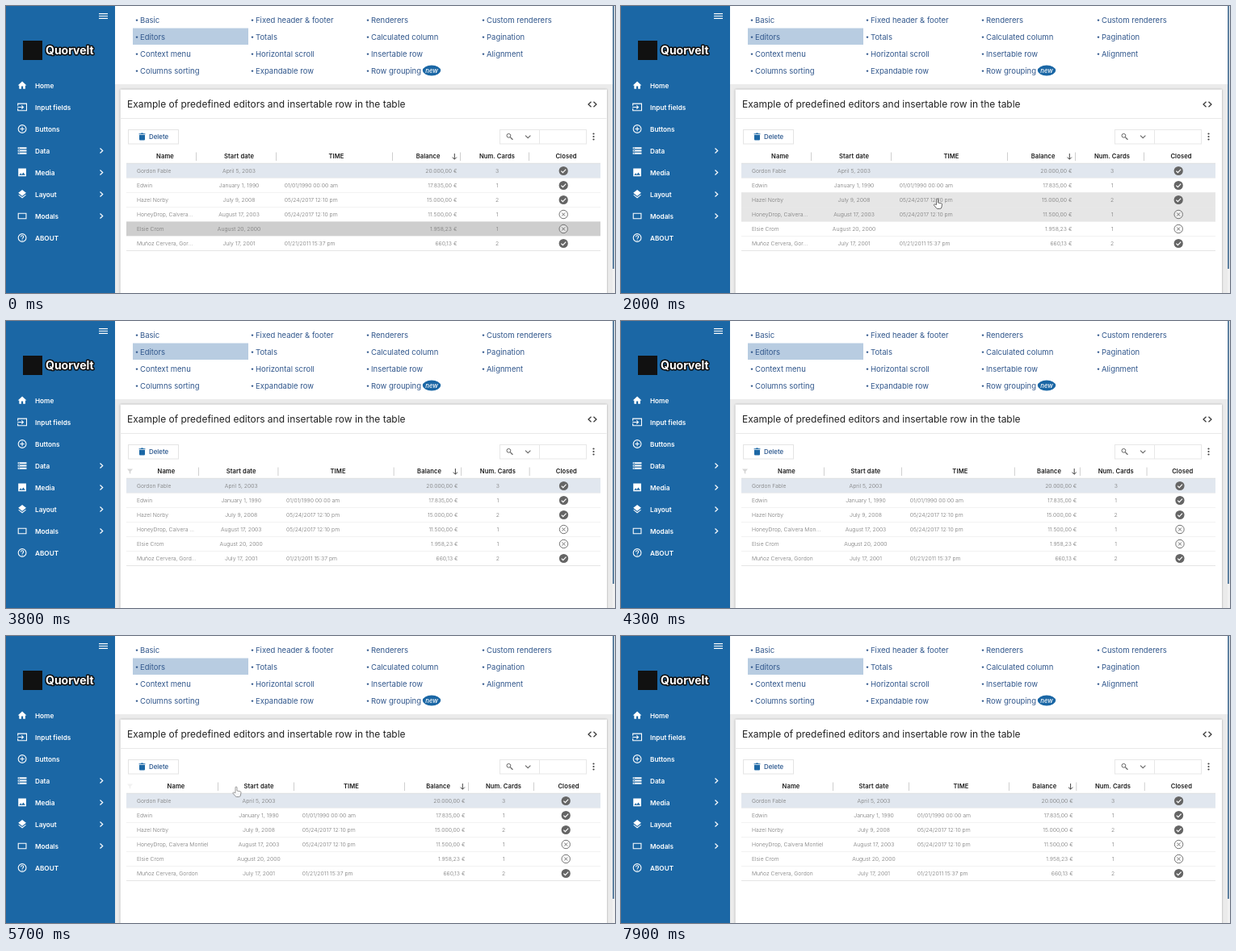
Write an HTML page that moves like this. It is 754 by 356 pixels and loops after 8000 ms.

```html
<!DOCTYPE html>
<html lang="en">
<head>
<meta charset="utf-8">
<title>Table demo</title>
<style>
  html, body { margin: 0; width: 100%; height: 100%; overflow: hidden; background: #fff; }
  svg { display: block; width: 754px; height: 356px; }
  text, .name { font-family: Inter, "Open Sans", sans-serif; }
  .link { font-size: 9.5px; fill: #31578c; }
  .side { font-size: 8.2px; font-weight: 600; fill: #fff; }
  .head { font-size: 7.6px; font-weight: 600; letter-spacing: .1px; fill: #1c1c1c; }
  .cell { font-size: 6.85px; font-weight: 300; fill: #777; }
  .name { font-size: 6.75px; font-weight: 300; line-height: 10px; color: #777;
          white-space: nowrap; overflow: hidden; text-overflow: ellipsis; }
  .mid { text-anchor: middle; }
  .end { text-anchor: end; }
  .card { filter: drop-shadow(0 0 1.2px #0005); }
</style>
</head>
<body>
<svg id="stage" viewBox="0 0 754 356"></svg>
<script>
const LOOP = 8000;
const BLUE = '#1b67a5';
const stage = document.getElementById('stage');

// ---- drawing helpers ----
const rect = (x, y, w, h, fill, extra = '') =>
  `<rect x="${x}" y="${y}" width="${w}" height="${h}" fill="${fill}" ${extra}/>`;
const path = (d, extra = '') => `<path d="${d}" ${extra}/>`;
const stroke = (d, color, width = 1, extra = '') =>
  path(d, `fill="none" stroke="${color}" stroke-width="${width}" ${extra}`);
const text = (x, y, str, cls, extra = '') =>
  `<text x="${x}" y="${y}" class="${cls}" ${extra}>${str.replace('&', '&amp;')}</text>`;

// ---- content ----
const links = [
  ['Basic', 'Editors', 'Context menu', 'Columns sorting'],
  ['Fixed header & footer', 'Totals', 'Horizontal scroll', 'Expandable row'],
  ['Renderers', 'Calculated column', 'Insertable row', 'Row grouping'],
  ['Custom renderers', 'Pagination', 'Alignment']
];

const ring = 'M12 3a9 9 0 100 18 9 9 0 100-18';
const sideItems = [
  ['Home', 'M10 20v-6h4v6h5v-8h3L12 3 2 12h3v8z', true],
  ['Input fields', 'M2 9V4H22V20H2V15M1 12H14M10.5 8l4 4-4 4'],
  ['Buttons', ring + 'M12 7v10M7 12h10'],
  ['Data', [4, 10, 16].map(y => `M2 ${y}h20v4H2zM4 ${y + 1}h2v2H4z`).join(''), true, true],
  ['Media', 'M3 3h18v18H3zM5 18h14l-4.5-6-3.5 4.5-2.5-3z', true, true],
  ['Layout', 'M12 2l9 7-9 7-9-7zM4.6 12.8l7.4 5.7 7.4-5.7 1.6 1.3-9 7-9-7z', true, true],
  ['Modals', 'M3 6h18v12H3z', false, true],
  ['ABOUT', ring + 'M9 10a3 3 0 116 0c0 2-3 2.3-3 4.5M12 16v2']
];

const rows = [
  ['Gordon Fable', 'April 5, 2003', '', '20.000,00 €', '3', true],
  ['Edwin', 'January 1, 1990', '01/01/1990 00:00 am', '17.835,00 €', '1', true],
  ['Hazel Norby', 'July 9, 2008', '05/24/2017 12:10 pm', '15.000,00 €', '2', true],
  ['HoneyDrop, Calvera Montiel', 'August 17, 2003', '05/24/2017 12:10 pm', '11.500,00 €', '1', false],
  ['Elsie Crom', 'August 20, 2000', '', '1.958,23 €', '1', false],
  ['Muñoz Cervera, Gordon', 'July 17, 2001', '01/21/2011 15:37 pm', '660,13 €', '2', true]
];
const headers = ['Name', 'Start date', 'TIME', 'Balance', 'Num. Cards', 'Closed'];
const rowTop = i => 195.5 + 18 * i;

// ---- static parts ----
function sidebar() {
  const items = sideItems.map(([label, d, solid, more], i) => {
    const y = 98.5 + 27 * i;
    const icon = solid ? path(d, 'fill="#fff" fill-rule="evenodd"') : stroke(d, '#fff', 2);
    return `<g transform="translate(13.6 ${y - 6.5}) scale(.54)">${icon}</g>` +
      text(36, y + 3, label, 'side') +
      (more ? stroke(`M116.5 ${y - 3}l3.2 3-3.2 3`, '#fff', 1.2) : '');
  }).join('');
  return rect(0, 0, 135, 356, BLUE) +
    stroke('M115 9.7h11M115 12.5h11M115 15.3h11', '#fff', 1.2) +
    rect(21, 43, 24, 24, '#111') +
    text(49, 59.5, 'Quorvelt', '', 'fill="#fff" font-size="14" font-weight="700" stroke="#111" stroke-width="3" stroke-linejoin="round" paint-order="stroke"') +
    items;
}

function topLinks() {
  const list = links.map((col, c) => col.map((label, r) => {
    const x = 166 + 143 * c, y = 17.3 + 21 * r;
    return `<circle cx="${x - 4}" cy="${y + .3}" r="1.2" fill="#31578c"/>` + text(x, y + 3.4, label, 'link');
  }).join('')).join('');
  return rect(135, 0, 616, 97, '#fff') + rect(157, 27.5, 143, 20.5, '#b8cce1') + list +
    `<ellipse cx="527" cy="80" rx="11.2" ry="6.4" fill="${BLUE}"/>` +
    text(527, 82.6, 'new', 'mid', 'fill="#fff" font-size="7.8" font-weight="500" font-style="italic"');
}

function card() {
  return rect(135, 97, 616, 259, '#ebebeb') +
    rect(141.5, 103.5, 602.5, 260, '#fff', 'class="card"') +
    text(150, 126, 'Example of predefined editors and insertable row in the table', '', 'font-size="11.97" fill="#222"') +
    stroke('M724.5 118.7l-3.5 3.3 3.5 3.3M727.5 118.7l3.5 3.3-3.5 3.3', '#333', 1.2) +
    stroke('M141.5 139.5H743.5', '#e9e9e9') +
    rect(151.5, 153.5, 62, 17.5, '#fff', 'stroke="#e4e4e4"') +
    path('M165 160h7v5.6a1 1 0 01-1 1h-5a1 1 0 01-1-1zM164.6 158.2h2.2l.6-.7h2.2l.6.7h2.2v1h-7.8z', `fill="${BLUE}"`) +
    text(177, 165.2, 'Delete', '', 'font-size="7.9" font-weight="500" fill="#24528a"') +
    rect(611.5, 153.5, 107, 17.5, '#fff', 'stroke="#e7e7e7"') +
    stroke('M660.5 153.5v17.5', '#e7e7e7') +
    '<circle cx="622.4" cy="160.8" r="2.4" fill="none" stroke="#666"/>' +
    stroke('M624.2 162.6l3.2 3.2', '#666', 1.3) +
    stroke('M643 160.7l3.2 3 3.2-3', '#666', 1.1) +
    [158.5, 162, 165.5].map(y => `<circle cx="727.5" cy="${y}" r="1.1" fill="#444"/>`).join('');
}

function statusIcon(checked) {
  return checked
    ? '<circle r="5.6" fill="#656565"/>' + stroke('M-2.8 .2l2 2 3.8-4', '#fff', 1.2)
    : '<circle r="5.2" fill="#fff" fill-opacity=".4" stroke="#707070"/>' + stroke('M-2 -2l4 4M2 -2l-4 4', '#707070');
}

function table() {
  const body = rows.map(([name, date, time, balance, cards, closed], i) => {
    const y = rowTop(i), base = y + 11.4;
    return rect(149, y, 587, 18, i ? '#fff' : '#e1e7ef') +
      rect(149, y, 587, 18, i ? '#cecece' : '#d0d3d8', 'class="hover"') +
      stroke(`M149 ${y + 18}H736`, '#dfdfdf', .8) +
      `<foreignObject class="clip" x="162" y="${y + 4}" width="71" height="10"><div class="name">${name}</div></foreignObject>` +
      text(0, base, date, 'cell mid date') + text(0, base, time, 'cell time') +
      text(0, base, balance, 'cell end balance') + text(0, base, cards, 'cell mid cards') +
      `<g class="status" data-y="${y + 9}">${statusIcon(closed)}</g>`;
  }).join('');
  const funnel = cls => path('M-3.5 -3h7l-2.7 3.3v3l-1.6-1v-2z', `class="${cls}" fill="#d6d6d6"`);
  return stroke('M149 195.3H736', '#d4d4d4') + body +
    headers.map(h => text(0, 189, h, 'head mid title')).join('') +
    headers.slice(1).map(() => stroke('M0 181.5v10.5', '#cfcfcf', 1, 'class="sep"')).join('') +
    stroke('M0 183v7M-2.6 187.6l2.6 2.6 2.6-2.6', '#444', 1, 'class="sort"') +
    funnel('nameFilter') + funnel('balanceFilter');
}

function cursor() {
  const look = 'fill="#fff" stroke="#444" stroke-width=".8" stroke-linejoin="round"';
  return '<g id="cursor">' +
    path('M-1 7.5V1a1 1 0 012 0v4l4 .8a1.3 1.3 0 011 1.4l-.7 3.8a2 2 0 01-2 1.5H.5a2 2 0 01-1.5-.8l-2.9-3.4a.9.9 0 011.3-1.2z', `id="hand" ${look}`) +
    path('M0 0v9l2.2-2 1.4 3.2 1.4-.6-1.4-3.1h3z', `id="arrow" ${look}`) + '</g>';
}

stage.innerHTML = card() + topLinks() + sidebar() + table() +
  rect(751, 0, 3, 356, '#f1f1f1') + rect(751.2, 0, 1.6, 326, '#38648c') + cursor();

// ---- motion ----
const all = cls => [...stage.querySelectorAll('.' + cls)];
const byId = id => document.getElementById(id);
const parts = Object.fromEntries(
  ['hover', 'clip', 'date', 'time', 'balance', 'cards', 'status', 'title', 'sep', 'sort', 'nameFilter', 'balanceFilter']
    .map(cls => [cls, all(cls)]));

const clamp = v => Math.max(0, Math.min(1, v));
// Linear interpolation through [time, ...values] stops.
function track(stops, t) {
  if (t <= stops[0][0]) return stops[0].slice(1);
  for (let i = 1; i < stops.length; i++) {
    const [a, b] = [stops[i - 1], stops[i]];
    if (t <= b[0]) return a.slice(1).map((v, k) => v + (b[k + 1] - v) * (t - a[0]) / (b[0] - a[0]));
  }
  return stops[stops.length - 1].slice(1);
}
const fade = (t, from, to, span = 200) => clamp((t - from) / span) * (1 - clamp((t - to) / span));

const widen = [[3600, 0], [3800, .11], [4100, .4], [4500, .78], [4900, .93], [5000, .93], [5200, 1]];
const shrink = [[7100, 0], [7300, .13], [7700, .75], [7900, .87]];
const pointer = [[1600, 462, 275], [1800, 425, 261], [2000, 391.5, 239], [2300, 335, 222],
  [2700, 262, 203], [3000, 243, 194], [3250, 236, 187],
  [5500, 262, 187], [5700, 285, 187], [6100, 430, 188], [6400, 496, 188.5], [6600, 496, 188.5], [6900, 494, 188]];
const hoverSpans = [[2450, 3000], [2200, 2450], [1900, 2200], [1750, 1900], [-1000, 1750], [9000, 9999]];

const setX = (els, x) => els.forEach(el => el.setAttribute('x', x));
const setOpacity = (el, v) => el.setAttribute('opacity', v);
const move = (el, x, y) => el.setAttribute('transform', `translate(${x} ${y})`);

function draw(t) {
  const [a] = track(widen, t);
  const b = a - track(shrink, t)[0];
  const s = [235 + 27 * a, 334 + 22 * a, 478 + 15 * b, 562 + 10 * b, 647 + 6 * b];
  const mid = (l, r, shift) => (l + r) / 2 + shift;

  const centers = [mid(149, s[0], 5), mid(s[0], s[1], 4), mid(s[1], s[2], 3),
    mid(s[2], s[3], 2.7), mid(s[3], s[4], 3.5), mid(s[4], 736, 2)];
  parts.title.forEach((el, i) => el.setAttribute('x', centers[i]));
  parts.sep.forEach((el, i) => move(el, s[i] + .5, 0));
  move(parts.sort[0], s[3] - 6.7, 0);
  parts.clip.forEach(el => el.setAttribute('width', s[0] - 164));
  setX(parts.date, centers[1]);
  setX(parts.time, s[1] + 10.7);
  setX(parts.balance, s[3] - 3.5);
  setX(parts.cards, centers[4]);
  parts.status.forEach(el => move(el, mid(s[4], 736, -1.3), el.dataset.y));

  parts.hover.forEach((el, i) => setOpacity(el, fade(t, ...hoverSpans[i])));

  const [nameFilter] = parts.nameFilter, [balanceFilter] = parts.balanceFilter;
  move(nameFilter, 153.5, 186.5);
  setOpacity(nameFilter, fade(t, 3350, 5600, 150));
  move(balanceFilter, s[2] + 8, 186.5);
  setOpacity(balanceFilter, fade(t, 6200, 6650, 150));

  const arrow = t > 2900 && t < 4500;
  move(byId('cursor'), ...track(pointer, t));
  setOpacity(byId('cursor'), t < 4500 ? fade(t, 1600, 3150, 120) : fade(t, 5600, 6700, 150));
  setOpacity(byId('arrow'), +arrow);
  setOpacity(byId('hand'), +!arrow);
}

let start;
function tick(now) {
  start ??= now;
  draw((now - start) % LOOP);
  requestAnimationFrame(tick);
}
draw(0);
requestAnimationFrame(tick);
</script>
</body>
</html>
```
